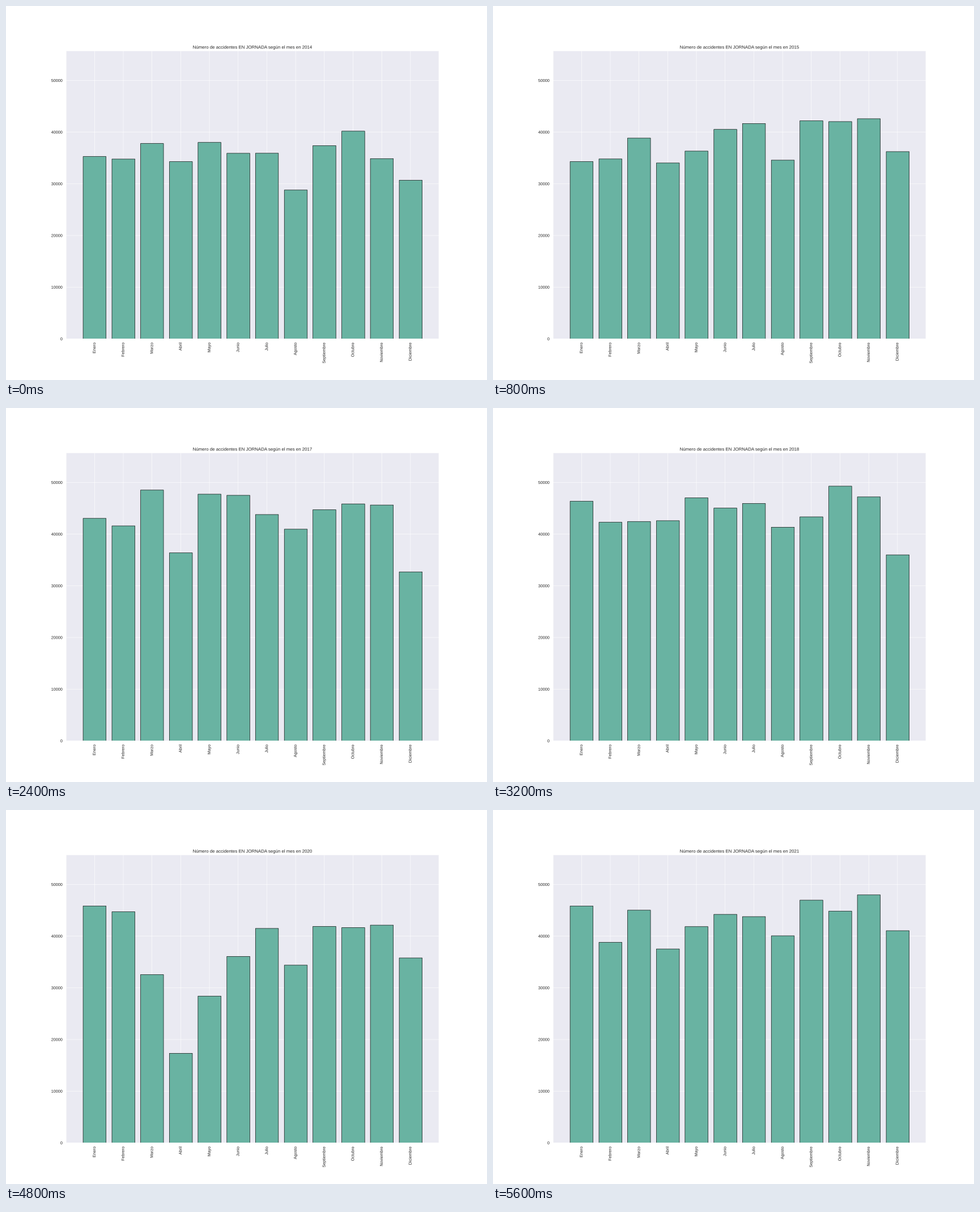
A matplotlib script that plays this animation: 849 by 660 pixels, repeating every 6400 ms.

```python
import numpy as np
import matplotlib.pyplot as plt
from matplotlib.animation import FuncAnimation
from matplotlib.patheffects import Normal

W, H, DPI = 849, 660, 48
PT = W / 18 / DPI  # point size on a chart 18 inches wide
INK = "0.15"
START, YEARS = 2014, 8
LEFT, RIGHT, TOP = -0.99, 11.99, 55723
PIXEL = (RIGHT - LEFT) / 1395  # data width of one pixel at 100 dpi

MONTHS = ["Enero", "Febrero", "Marzo", "Abril", "Mayo", "Junio", "Julio",
          "Agosto", "Septiembre", "Octubre", "Noviembre", "Diciembre"]
FIXED_HOLIDAYS = ["01-01", "01-06", "05-01", "08-15", "10-12", "11-01",
                  "12-06", "12-08", "12-25"]

# Accidents per working day at key months, counted from the first January
RATE = {0: 1680, 2: 1800, 4: 1810, 6: 1610, 8: 1700, 11: 1690,
        24: 2020, 26: 1950, 36: 2050, 40: 2170, 47: 2100, 63: 2220,
        66: 2378, 71: 2130, 73: 2236, 74: 1480, 75: 912, 76: 1420,
        78: 1860, 83: 1970, 84: 2412, 85: 1940, 89: 2010, 95: 2260}
SEASON = {6: 0.97, 7: 0.87, 9: 1.03, 10: 1.03, 11: 0.865}


def easter(year):
    d = (19 * (year % 19) + 24) % 30
    e = (2 * (year % 4) + 4 * (year % 7) + 6 * d + 5) % 7
    return np.datetime64(f"{year}-03-22") + int(d + e)


def accidents(year):
    sunday = easter(year)
    holidays = [np.datetime64(f"{year}-{day}") for day in FIXED_HOLIDAYS]
    holidays += [sunday - 3, sunday - 2, sunday + 1]
    months = np.datetime64(f"{year}-01") + np.arange(13)
    days = months.astype("datetime64[D]")
    work = np.busday_count(days[:-1], days[1:], holidays=holidays)
    rate = np.interp(12 * (year - START) + np.arange(12),
                     list(RATE), list(RATE.values()))
    return work * rate * [SEASON.get(m, 1) for m in range(12)]


def snap(x):
    """Move x to the centre of a pixel of the 100 dpi chart."""
    return (np.floor((x - LEFT) / PIXEL + 0.5) + 0.5) * PIXEL + LEFT


plt.rcParams.update({"font.family": "Liberation Sans", "text.hinting": "none"})

fig = plt.figure(figsize=(W / DPI, H / DPI), dpi=DPI, facecolor="white")
ax = fig.add_axes([0.125, 0.11, 0.775, 0.77], facecolor="#eaeaf2")
ax.set_axisbelow(True)

slots = np.arange(12)
starts, ends = snap(slots - 0.4), snap(slots + 0.4)
bars = ax.bar(starts, accidents(START), width=ends - starts, align="edge",
              color="#69b3a2", edgecolor="black", linewidth=PT)
ax.set_xlim(LEFT, RIGHT)
ax.set_ylim(0, TOP)
ax.set_xticks(slots, MONTHS, rotation=90)
ax.set_yticks(range(0, 50001, 10000))
ax.tick_params(length=6 * PT, pad=3.5 * PT, left=False, bottom=False,
               labelsize=11 * PT, labelcolor=INK)
ax.grid(color="white", linewidth=PT)
title = ax.set_title("", fontsize=12 * PT, color=INK, pad=6 * PT)

for spine in ax.spines.values():
    spine.set(color="white", linewidth=1.25 * PT)

# Smooth edges and text at fractional pixel positions
for part in [*bars, *ax.get_xgridlines(), *ax.get_ygridlines(),
             *ax.spines.values()]:
    part.set_snap(False)
for text in [title, *ax.get_xticklabels(), *ax.get_yticklabels()]:
    text.set_path_effects([Normal()])


def draw(i):
    year = START + i % YEARS
    for bar, count in zip(bars, accidents(year)):
        bar.set_height(count)
    title.set_text(f"Número de accidentes EN JORNADA según el mes en {year}")
    return [*bars, title]


anim = FuncAnimation(fig, draw, frames=YEARS, interval=800, repeat=True)
plt.show()
```
